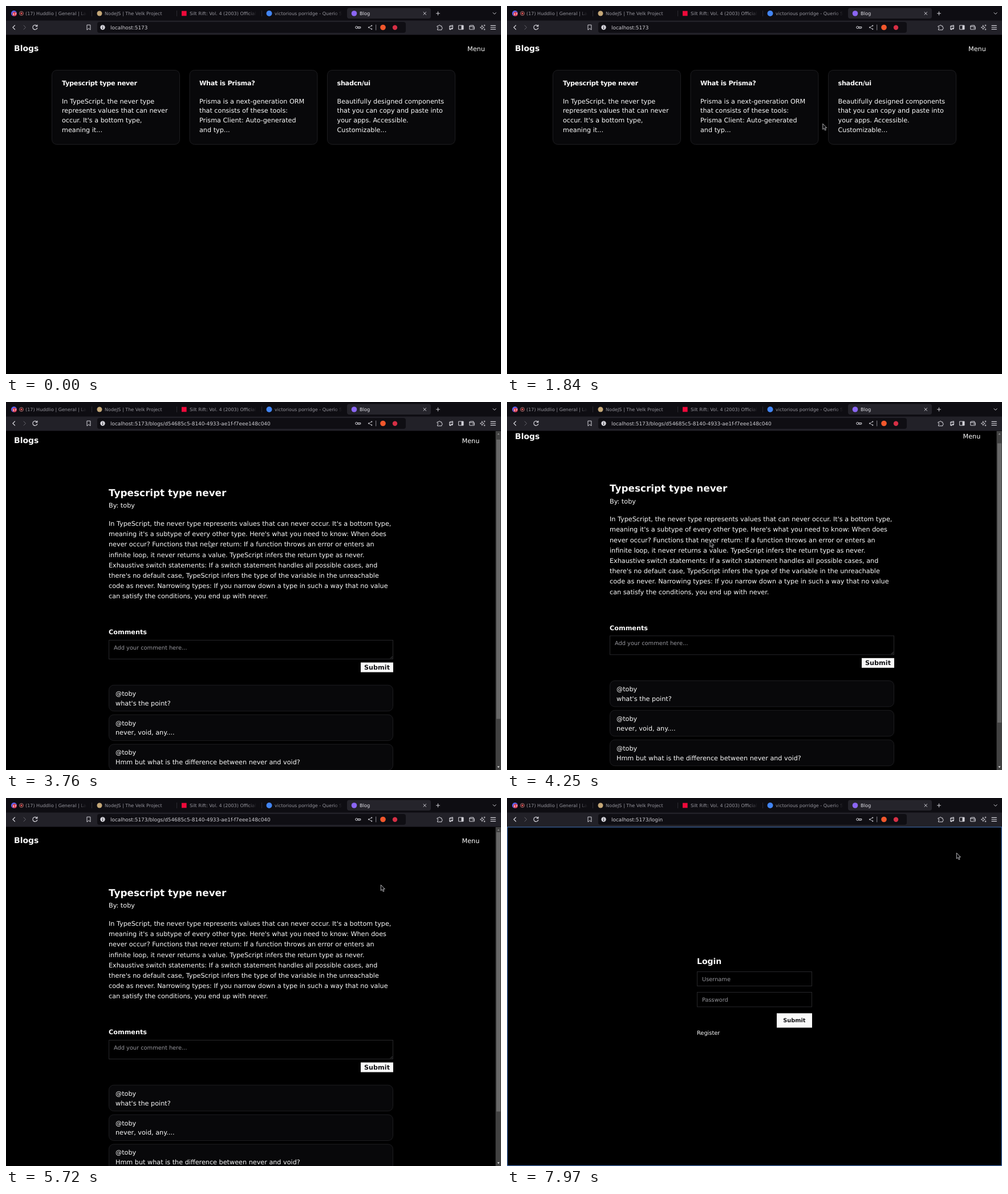
An HTML page for the animation above (7990 ms loop, 868 by 645 pixels).

```html
<!DOCTYPE html>
<html lang="en">
<head>
<meta charset="utf-8">
<title>Blog</title>
<style>
@property --scroll { syntax: '<length>'; inherits: true; initial-value: 0px; }
html, body { margin: 0; width: 100%; height: 100%; overflow: hidden; background: #000; }
svg { display: block; width: 100%; height: 100%; }
text { font: 11.22px "DejaVu Sans", sans-serif; fill: #fafafa; text-rendering: geometricPrecision; white-space: pre; }
.h1 { font-size: 16.83px; font-weight: bold; }
.h2 { font-size: 14px; font-weight: bold; }
.h3 { font-weight: bold; }
.h4 { font-weight: bold; letter-spacing: -.025em; }
.small { font-size: 9.8px; }
.hint { font-size: 9.8px; fill: #96969c; }
.dark { font-weight: bold; fill: #111114; }
.tab { font-size: 8.05px; fill: #96959d; }
.url { font-size: 8.9px; fill: #cfced4; }
.card { fill: #08080a; stroke: #1d1d20; }
.field { fill: #000; stroke: #27272a; }
.icon { fill: none; stroke: #d4d3da; stroke-width: 1; stroke-linecap: round; stroke-linejoin: round; }

/* One shared 7.99 s clock; a percentage is ms / 79.9 */
.home, .blog, .bar, .login, .menu, .focus, .pointer { animation: 7.99s step-end infinite; }
.home { animation-name: home; }
.blog { animation-name: blog; }
.bar { animation-name: bar; }
.login { animation-name: login; }
.menu { animation-name: menu; }
.focus { animation-name: focus; }
.pointer { animation-name: pointer; }
.scroller { animation: scroll 7.99s linear infinite; }
.page { transform: translateY(calc(-1 * var(--scroll))); }
.thumb { transform: translateY(calc(.846 * var(--scroll))); }
.path { animation: path 7.99s linear infinite; }

@keyframes home { 0% { visibility: visible } 30.91%, 100% { visibility: hidden } }
@keyframes blog { 0% { visibility: hidden } 30.91% { visibility: visible } 93.99%, 100% { visibility: hidden } }
/* the open menu locks scrolling and hides the scrollbar */
@keyframes bar { 0% { visibility: hidden } 30.91% { visibility: visible } 83.47%, 100% { visibility: hidden } }
@keyframes login { 0% { visibility: hidden } 93.99%, 100% { visibility: visible } }
@keyframes menu { 0% { visibility: hidden } 83.47% { visibility: visible } 93.99%, 100% { visibility: hidden } }
@keyframes focus { 0% { visibility: hidden } 95.99%, 100% { visibility: visible } }
@keyframes pointer { 0% { visibility: hidden } 12.51%, 100% { visibility: visible } }
@keyframes scroll {
  0%, 47.04% { --scroll: 0px }
  47.05% { --scroll: 6.8px }
  47.93%, 53.18% { --scroll: 12.6px }
  53.19% { --scroll: 14.6px }
  55.06%, 63.07% { --scroll: 22.4px }
  63.08% { --scroll: 9px }
  63.45%, 100% { --scroll: 0px }
}
@keyframes path {
  0%, 14.39% { transform: translate(863px, 207px) }
  15.8% { transform: translate(780px, 248px) }
  17.5% { transform: translate(668px, 259px) }
  19.9%, 23.02% { transform: translate(557px, 208px) }
  23.03% { transform: translate(554px, 206px) }
  25% { transform: translate(440px, 192px) }
  27% { transform: translate(300px, 194px) }
  28.78%, 41.04% { transform: translate(222px, 206px) }
  42.43%, 68.58% { transform: translate(355.5px, 243.5px) }
  70% { transform: translate(510px, 194px) }
  71.58%, 73.33% { transform: translate(657px, 152px) }
  77% { transform: translate(722px, 108px) }
  80% { transform: translate(782px, 84px) }
  83.1%, 87% { transform: translate(805.5px, 75.5px) }
  92.74%, 100% { transform: translate(788px, 96px) }
}
</style>
</head>
<body>
<svg viewBox="0 0 868 645">
  <defs>
    <linearGradient id="fade">
      <stop offset="0" stop-color="#0e0d12" stop-opacity="0"/>
      <stop offset=".65" stop-color="#0e0d12"/>
    </linearGradient>
  </defs>
  <rect width="868" height="645"/>

  <g class="home">
    <text class="h2" x="14" y="79.3">Blogs</text>
    <text x="809" y="78.6">Menu</text>
    <g class="card">
      <rect x="80.5" y="112.5" width="224" height="130" rx="8.4"/>
      <rect x="322" y="112.5" width="224" height="130" rx="8.4"/>
      <rect x="563.5" y="112.5" width="224" height="130" rx="8.4"/>
    </g>
    <text class="h4" x="98" y="139">Typescript type never</text>
    <text y="170.5"><tspan x="98">In TypeScript, the never type</tspan><tspan x="98" dy="16.8">represents values that can never</tspan><tspan x="98" dy="16.8">occur. It's a bottom type,</tspan><tspan x="98" dy="16.8">meaning it...</tspan></text>
    <text class="h4" x="339" y="139">What is Prisma?</text>
    <text y="170.5"><tspan x="339">Prisma is a next-generation ORM</tspan><tspan x="339" dy="16.8">that consists of these tools:</tspan><tspan x="339" dy="16.8">Prisma Client: Auto-generated</tspan><tspan x="339" dy="16.8">and typ...</tspan></text>
    <text class="h4" x="580.5" y="139">shadcn/ui</text>
    <text y="170.5"><tspan x="580.5">Beautifully designed components</tspan><tspan x="580.5" dy="16.8">that you can copy and paste into</tspan><tspan x="580.5" dy="16.8">your apps. Accessible.</tspan><tspan x="580.5" dy="16.8">Customizable...</tspan></text>
  </g>

  <g class="blog"><g class="scroller">
    <g class="page">
      <text class="h2" x="14" y="79.3">Blogs</text>
      <text x="799.5" y="78.6">Menu</text>
      <text class="h1" x="180" y="171.8">Typescript type never</text>
      <text x="180" y="192.2">By: toby</text>
      <text y="223.9"><tspan x="180">In TypeScript, the never type represents values that can never occur. It's a bottom type,</tspan><tspan x="180" dy="18.2">meaning it's a subtype of every other type. Here's what you need to know: When does</tspan><tspan x="180" dy="18.2">never occur? Functions that never return: If a function throws an error or enters an</tspan><tspan x="180" dy="18.2">infinite loop, it never returns a value. TypeScript infers the return type as never.</tspan><tspan x="180" dy="18.2">Exhaustive switch statements: If a switch statement handles all possible cases, and</tspan><tspan x="180" dy="18.2">there's no default case, TypeScript infers the type of the variable in the unreachable</tspan><tspan x="180" dy="18.2">code as never. Narrowing types: If you narrow down a type in such a way that no value</tspan><tspan x="180" dy="18.2">can satisfy the conditions, you end up with never.</tspan></text>
      <text class="h3" x="180" y="414.3">Comments</text>
      <rect class="field" x="180.5" y="424.5" width="498" height="33"/>
      <path d="M674 456.5l3.5-3.5M676.5 456.5l1-1" stroke="#77777c" stroke-width=".7"/>
      <text class="hint" x="189" y="440.5">Add your comment here...</text>
      <rect x="622" y="463.5" width="57" height="17" fill="#fafafa"/>
      <text class="dark" x="628" y="475.8">Submit</text>
      <g class="card">
        <rect x="180.5" y="503.2" width="498" height="45.5" rx="8.4"/>
        <rect x="180.5" y="555" width="498" height="45.5" rx="8.4"/>
        <rect x="180.5" y="606.8" width="498" height="45.5" rx="8.4"/>
      </g>
      <text y="521.8"><tspan x="192">@toby</tspan><tspan x="192" dy="16.8">what's the point?</tspan></text>
      <text y="573.6"><tspan x="192">@toby</tspan><tspan x="192" dy="16.8">never, void, any....</tspan></text>
      <text y="625.4"><tspan x="192">@toby</tspan><tspan x="192" dy="16.8">Hmm but what is the difference between never and void?</tspan></text>
    </g>
    <g class="bar">
      <rect x="858.5" y="51" width="9.5" height="594" fill="#424242"/>
      <rect class="thumb" x="860" y="60" width="7" height="489.5" fill="#686868"/>
      <path d="M861.5 57.2h4l-2-2.6z" fill="#8a8a8a"/>
      <path d="M861.5 638.6h4l-2 2.6z" fill="#e6e6e6"/>
    </g>
  </g></g>

  <g class="menu">
    <rect x="740.5" y="85.5" width="90" height="29" stroke="#f0f0f0"/>
    <text class="small" x="750" y="103.2">Login</text>
  </g>

  <g class="login">
    <text class="h2" x="333" y="290.7">Login</text>
    <rect class="field" x="333.5" y="304.5" width="201" height="25"/>
    <text class="hint" x="342" y="320.7">Username</text>
    <rect class="field" x="333.5" y="340.5" width="201" height="25.5"/>
    <text class="hint" x="342" y="356.8">Password</text>
    <rect x="473" y="377.3" width="62" height="25.2" fill="#fafafa"/>
    <text class="small dark" x="484.2" y="393.2">Submit</text>
    <text class="small" x="333" y="415">Register</text>
  </g>

  <!-- tab strip -->
  <rect width="868" height="26" fill="#0e0d12"/>
  <rect x="598" y="3.5" width="147" height="18.5" rx="4" fill="#25242b"/>
  <path d="M150.5 8v10M299.5 8v10M448.5 8v10" stroke="#2b2a32"/>
  <circle cx="14" cy="13" r="5" fill="#5865f2"/>
  <circle cx="15" cy="14" r="3.8" fill="#d9283c"/>
  <text x="15" y="16" text-anchor="middle" style="font-size:5px;font-weight:bold">17</text>
  <circle cx="27" cy="13" r="3.5" fill="none" stroke="#e28a8a" stroke-width=".8"/>
  <circle cx="27" cy="13" r="1.7" fill="#e05050"/>
  <text class="tab" x="34" y="15.9">(17) Huddlio | General | La</text>
  <circle cx="164" cy="13" r="4.5" fill="#c5a878"/>
  <text class="tab" x="173" y="15.9">NodeJS | The Velk Project</text>
  <rect x="308" y="8.7" width="8.6" height="8.6" fill="#f0093a"/>
  <text class="tab" x="322" y="15.9">Silt Rift: Vol. 4 (2003) Official</text>
  <circle cx="461.5" cy="13" r="5" fill="#4285f4"/>
  <text class="tab" x="471" y="15.9">victorious porridge - Querio S</text>
  <g fill="url(#fade)">
    <rect x="126" y="6" width="23" height="14"/>
    <rect x="425" y="6" width="22" height="14"/>
    <rect x="575" y="6" width="22" height="14"/>
  </g>
  <circle cx="610.5" cy="13" r="4.8" fill="#8b66f5"/>
  <text class="tab" x="620" y="15.9" style="font-size:8.3px;fill:#e2e1e8">Blog</text>
  <path class="icon" d="M732 10.7l4.6 4.6M736.6 10.7l-4.6 4.6M754.5 13h6M757.5 10v6M854 11.7l2.6 2.6 2.6-2.6"/>

  <!-- toolbar -->
  <rect y="25.5" width="868" height="25" fill="#222128"/>
  <rect x="160" y="28" width="541" height="19" rx="4" fill="#0f0e13"/>
  <g class="icon">
    <path d="M15.5 34l-3.6 3.5 3.6 3.5" stroke-width="1.2"/>
    <path d="M31 34l3.6 3.5-3.6 3.5" stroke="#64636b"/>
    <path d="M54.2 35a4 4 0 1 0 .6 3.5M54.9 33v2.7h-2.7" stroke-width="1.2"/>
    <path d="M142.3 33.2h5.6v8.6l-2.8-2.4-2.8 2.4z"/>
    <circle cx="614.7" cy="37.5" r="2"/>
    <path d="M616.8 36.5h5v2.4h-5M619 38.5v1"/>
    <path d="M636 37.5l5.2-3M636 37.5l5.2 3" stroke-width=".8"/>
    <path d="M648.7 33v9" stroke="#8b8a92"/>
    <path d="M756.5 35h2.2a1.5 1.5 0 0 1 3 0h2.2v2.3a1.4 1.4 0 0 1 0 2.8v1.8h-7.4v-2a1.4 1.4 0 0 0 0-2.8z"/>
    <path d="M777.8 40.5v-5.6l5.6-1.2v5.6M777.8 36.6l5.6-1.2"/>
    <rect x="794" y="34" width="8" height="7"/>
    <path d="M812.8 35v6h8.4v-5h-8.4q0-2 2-2h5v2M818.2 38.5h3"/>
    <path d="M834.8 34l1 2.6 2.6 1-2.6 1-1 2.6-1-2.6-2.6-1 2.6-1zM839 33v2M838 34h2M839 40v2M838 41h2" stroke-width=".9"/>
    <path d="M850 34.3h8.4M850 37.5h8.4M850 40.7h8.4" stroke-width="1.2"/>
  </g>
  <g fill="#d4d3da">
    <circle cx="636" cy="37.5" r="1.1"/>
    <circle cx="641.2" cy="34.5" r="1.1"/>
    <circle cx="641.2" cy="40.5" r="1.1"/>
    <rect x="798.5" y="34" width="3.5" height="7"/>
    <circle cx="779" cy="40.5" r="1.5"/>
    <circle cx="782" cy="39.4" r="1.5"/>
    <circle cx="169.5" cy="37.5" r="4.2"/>
  </g>
  <path d="M169.5 35v1M169.5 37.2v2.8" stroke="#0f0e13" stroke-width="1.1"/>
  <circle cx="661" cy="37.5" r="4.8" fill="#f2572c"/>
  <circle cx="682" cy="37.7" r="4.2" fill="#d62f45"/>
  <text class="url home" x="183" y="40.7">localhost:5173</text>
  <text class="url blog" x="183" y="40.7">localhost:5173/blogs/d54685c5-8140-4933-ae1f-f7eee148c040</text>
  <text class="url login" x="183" y="40.7">localhost:5173/login</text>

  <rect class="focus" x=".5" y="51" width="867" height="593.5" fill="none" stroke="#4f80cc"/>
  <g class="pointer"><path class="path" d="M.3.3v10l2.3-2 1.7 3.7 1.7-.8-1.7-3.6h3.1z" fill="#08080a" stroke="#c9c9cc" stroke-width=".9" stroke-linejoin="round"/></g>
</svg>
</body>
</html>
```
